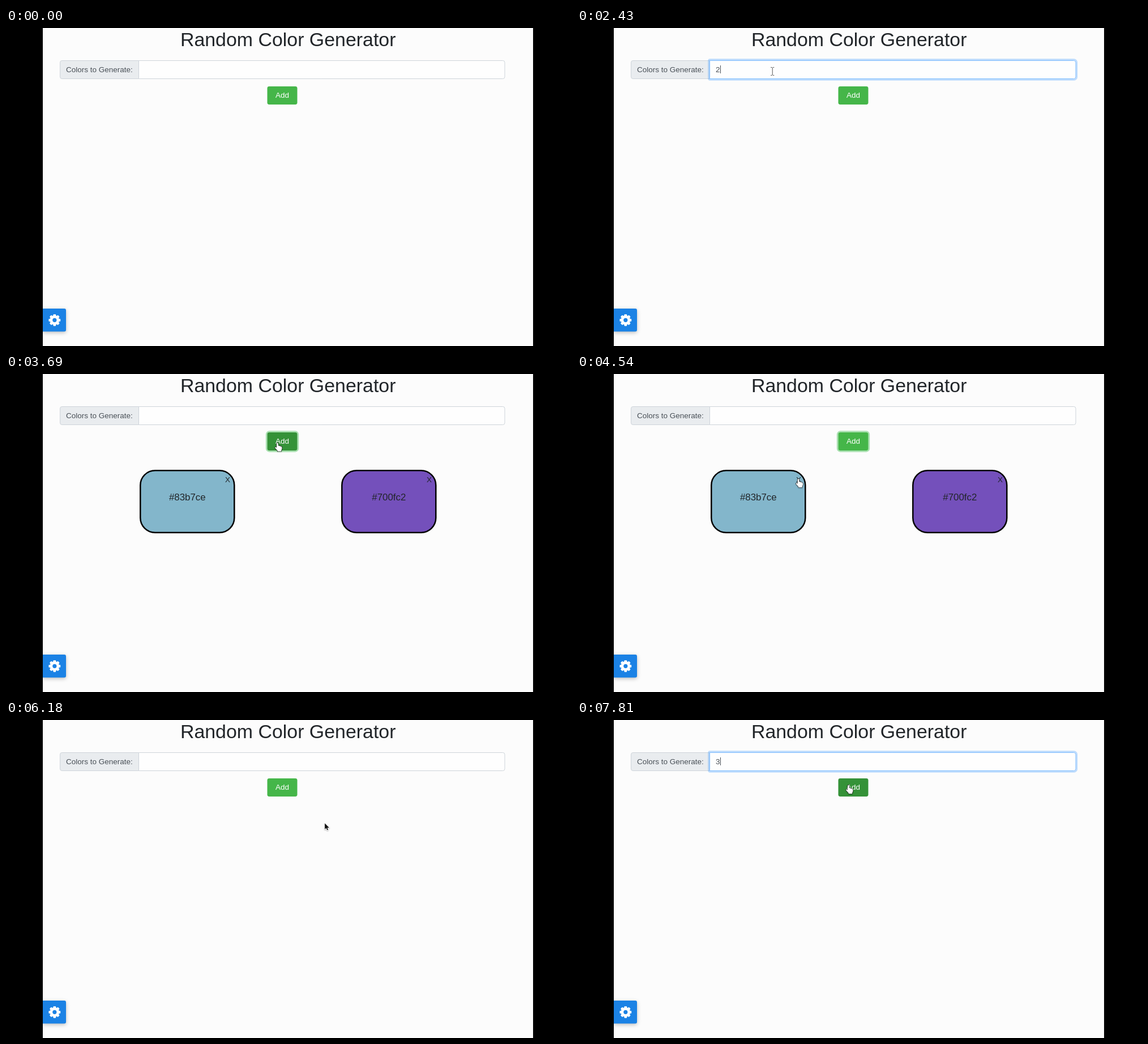
Recreate the animation shown at these times as an HTML page with a canvas. Size 998 by 561 pixels, loop 8000 ms.

```html
<!DOCTYPE html>
<html lang="en">
<head>
<meta charset="utf-8">
<title>Random Color Generator</title>
<style>
  html, body { margin: 0; width: 100%; height: 100%; overflow: hidden; background: #000; }
  canvas { display: block; width: 998px; height: 561px; }
</style>
</head>
<body>
<canvas id="stage" width="998" height="561"></canvas>
<script>
const ctx = document.getElementById('stage').getContext('2d');
const LOOP = 8000, BLINK = 500, FADE = 120;
const FONT = '"Liberation Sans", Arial, sans-serif';
const INK = '#212529', FIELD_INK = '#495057', BLUE = '#1b82e5';

const page = { x: 65, y: 0, w: 866, h: 561 };
const input = { x: 234.5, y: 57.5, w: 646.5, h: 32 };
const button = { x: 461.5, y: 103, w: 53, h: 32 };
const cardSize = { y: 169, w: 168.5, h: 112, gap: 356 };

const sessions = [
  { focus: 1240, type: 2240, submit: 3430, value: '2' },
  { focus: 6810, type: 7320, submit: Infinity, value: '3' }
];
const cards = [
  { label: '#83b7ce', fill: '#83b6cb', removed: 4850 },
  { label: '#700fc2', fill: '#7450bb', removed: 6120 }
];

const clamp = v => Math.max(0, Math.min(1, v));
const ease = v => { v = clamp(v); return v * v * (3 - 2 * v); };
const fade = (t, on, off) => ease((t - on) / FADE) * (1 - ease((t - off) / FADE));
const mix = (a, b, k) => `rgb(${a.map((v, i) => Math.round(v + (b[i] - v) * k))})`;
const inside = (p, r) => p.x > r.x && p.x < r.x + r.w && p.y > r.y && p.y < r.y + r.h;

// Cards share the row evenly around its centre.
const cardX = (i, count) => 498.3 + (i - (count - 1) / 2) * cardSize.gap - cardSize.w / 2;
const closeBox = x => ({ x: x + 150, y: 179, w: 12, h: 14 });
const closeSpot = x => ({ x: x + 155, y: 185 });

const moves = [
  { from: 950, to: 1190, x: 343, y: 76 },
  { from: 2390, to: 2920, x: 474.5, y: 104 },
  { from: 3120, to: 3400, x: 479.5, y: 121.5 },
  { from: 4020, to: 4540, ...closeSpot(cardX(0, 2)) },
  { from: 4880, to: 5380, x: 692, y: 198 },
  { from: 5380, to: 5860, ...closeSpot(cardX(0, 1)) },
  { from: 6120, to: 6740, x: 351, y: 80 },
  { from: 7380, to: 7800, x: 479.5, y: 115 }
];

function pointerAt(t) {
  const p = { x: 430, y: 570 };
  for (const m of moves) {
    const k = ease((t - m.from) / (m.to - m.from));
    p.x += (m.x - p.x) * k;
    p.y += (m.y - p.y) * k;
  }
  return p;
}

function visibleCards(t) {
  const shown = t < sessions[0].submit + 50 ? [] : cards.filter(c => t < c.removed);
  return shown.map((c, i) => ({ ...c, x: cardX(i, shown.length) }));
}

function text(str, x, y, size, color, align = 'center') {
  ctx.font = `${size}px ${FONT}`;
  ctx.textAlign = align;
  ctx.fillStyle = color;
  ctx.fillText(str, x, y);
}

function box({ x, y, w, h }, r, fill, stroke, line = 1) {
  ctx.beginPath();
  ctx.roundRect(x, y, w, h, r);
  if (fill) { ctx.fillStyle = fill; ctx.fill(); }
  if (stroke) { ctx.strokeStyle = stroke; ctx.lineWidth = line; ctx.stroke(); }
}

const grow = (r, d) => ({ x: r.x - d, y: r.y - d, w: r.w + 2 * d, h: r.h + 2 * d });

function disc(r, fill) {
  ctx.fillStyle = fill;
  ctx.beginPath();
  ctx.arc(0, 0, r, 0, Math.PI * 2);
  ctx.fill();
}

function gearButton() {
  ctx.save();
  ctx.shadowColor = 'rgba(0,0,0,.25)';
  ctx.shadowBlur = 7;
  ctx.shadowOffsetY = 2;
  box({ x: page.x, y: 495, w: 41, h: 40.5 }, [0, 3, 3, 0], BLUE);
  ctx.restore();

  ctx.save();
  ctx.translate(85.8, 515.3);
  disc(8.3, '#fff');
  for (let i = 0; i < 8; i++) {
    box({ x: -2.4, y: -10.4, w: 4.8, h: 5 }, 1.2, '#fff');
    ctx.rotate(Math.PI / 4);
  }
  disc(3.6, BLUE);
  ctx.restore();
}

function inputRow(t) {
  const session = sessions.find(s => t < s.submit + FADE);
  const { focus, type, submit, value } = session;
  const glow = fade(t, focus, submit);
  const typed = t >= type && t < submit;

  box({ x: 95.5, y: input.y, w: 139, h: input.h }, [3.4, 0, 0, 3.4], '#e9ecef', '#ced4da');
  text('Colors to Generate:', 106, 77.7, 13.5, FIELD_INK, 'left');
  box(input, [0, 3.4, 3.4, 0], '#fefefe', mix([206, 212, 218], [128, 189, 255], glow));
  if (glow > 0) box(grow(input, 1.8), [2, 5, 5, 2], null, `rgba(0,123,255,${0.25 * glow})`, 2.7);
  if (typed) text(value, 245, 77.7, 13.5, FIELD_INK, 'left');

  // Typing restarts the caret blink.
  const since = t - (typed ? type : focus);
  if (since >= 0 && t < submit && Math.floor(since / BLINK) % 2 === 0) {
    ctx.fillStyle = FIELD_INK;
    ctx.fillRect(typed ? 253 : 245.3, 66, 1, 14);
  }
}

function addButton(t, hover) {
  const ring = fade(t, sessions[0].submit, cards[0].removed - FADE);
  if (ring > 0) box(grow(button, 1.3), 4.8, null, `rgba(70,190,85,${0.45 * ring})`, 2.7);
  box(button, 3.4, hover ? '#359238' : '#45b649');
  text('Add', 488, 123.2, 13.5, '#fff');
}

function card({ x, fill, label }) {
  box(grow({ ...cardSize, x }, -1.25), 26, fill, '#000', 2.5);
  text(label, x + cardSize.w / 2, 223, 16.9, INK);
  text('X', x + 155.5, 191, 13.5, INK);
}

const arrow = new Path2D('M0 0V12.4L2.9 9.8 4.8 14.2 6.9 13.3 5 9H9Z');
const hand = new Path2D('M-1.6 1Q0-1.2 1.6 1V6Q3 5 4 6.6 5.4 5.8 6.4 7.3 9 7 9.2 9.5V12Q9 14 7.8 15.5V17.5H.2V16L-4.4 11Q-5.8 8.6-3.6 8.4L-1.6 10Z');
const beam = new Path2D('M-3-7H-1L0-6 1-7H3M0-6V6M-3 7H-1L0 6 1 7H3');

function pointer(p, pointing) {
  ctx.save();
  ctx.translate(p.x, p.y);
  ctx.lineJoin = 'round';
  if (inside(p, input)) {
    ctx.strokeStyle = '#555';
    ctx.lineWidth = 1;
    ctx.stroke(beam);
  } else {
    ctx.scale(0.86, 0.86);
    const shape = pointing ? hand : arrow;
    ctx.strokeStyle = pointing ? '#111' : '#fff';
    ctx.fillStyle = pointing ? '#fff' : '#111';
    ctx.lineWidth = pointing ? 1.3 : 2;
    ctx.shadowColor = 'rgba(0,0,0,.3)';
    ctx.shadowBlur = 2;
    ctx.shadowOffsetY = 1;
    ctx.stroke(shape);
    ctx.shadowColor = 'transparent';
    ctx.fill(shape);
  }
  ctx.restore();
}

function draw() {
  const t = performance.now() % LOOP;
  const p = pointerAt(t);
  const shown = visibleCards(t);
  const overButton = inside(p, button);
  const overClose = shown.some(c => inside(p, closeBox(c.x)));

  ctx.fillStyle = '#000';
  ctx.fillRect(0, 0, 998, 561);
  ctx.save();
  ctx.beginPath();
  ctx.rect(page.x, page.y, page.w, page.h);
  ctx.clip();
  ctx.fillStyle = '#fcfcfc';
  ctx.fillRect(page.x, page.y, page.w, page.h);

  text('Random Color Generator', 498.2, 32.2, 33.9, INK);
  inputRow(t);
  addButton(t, overButton);
  shown.forEach(card);
  gearButton();
  pointer(p, overButton || overClose);
  ctx.restore();
  requestAnimationFrame(draw);
}
draw();
</script>
</body>
</html>
```
